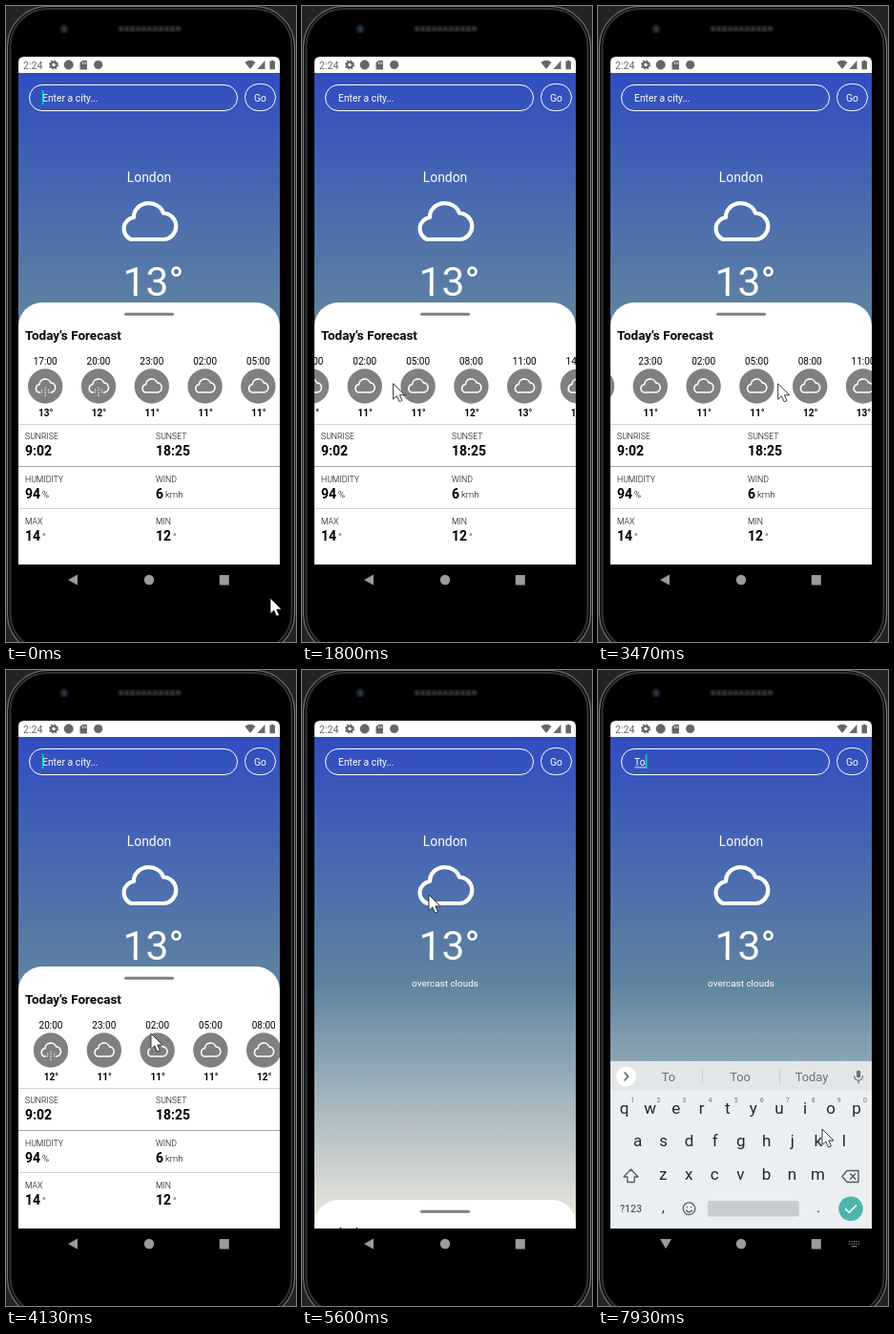
An HTML page for the animation above (8 s loop, 304 px wide and 665 px high).

```html
<!DOCTYPE html>
<html lang="en">
<head>
<meta charset="utf-8">
<title>Weather app</title>
<style>
  html, body { margin: 0; width: 100%; height: 100%; overflow: hidden; background: #000; }
  svg { display: block; width: 100%; height: 100%; font-family: Roboto, sans-serif; }
  .mid { text-anchor: middle; }
  .bold { font-weight: 700; }
  .light { font-weight: 300; }
  .line { fill: none; stroke-linecap: round; stroke-linejoin: round; }
</style>
</head>
<body>
<svg id="stage" viewBox="0 0 304 665"></svg>
<script>
const LOOP = 8000;
const stage = document.getElementById('stage');
const $ = id => document.getElementById(id);

const text = (x, y, size, str, cls = '', extra = '') =>
  `<text x="${x}" y="${y}" font-size="${size}" class="${cls}" ${extra}>${str}</text>`;
const rect = (x, y, w, h, fill, r = 0, extra = '') =>
  `<rect x="${x}" y="${y}" width="${w}" height="${h}" rx="${r}" fill="${fill}" ${extra}/>`;
const circle = (x, y, r, fill, extra = '') =>
  `<circle cx="${x}" cy="${y}" r="${r}" fill="${fill}" ${extra}/>`;
const line = (d, color, width = 1, extra = '') =>
  `<path class="line" d="${d}" stroke="${color}" stroke-width="${width}" ${extra}/>`;
const shape = (d, fill, extra = '') => `<path d="${d}" fill="${fill}" ${extra}/>`;

const cloud = (x, y, scale) => line(
  'M-19 19H16A13.8 13.8 0 0 0 15-8.5A15.8 14 0 0 0-16-4A12 12 0 0 0-19 19Z', '#fff', 4.2,
  `transform="translate(${x} ${y}) scale(${scale})"`);

function phone() {
  return rect(0, 0, 304, 665, '#232324') +
    rect(1.5, .5, 301, 677, '#08090a', 42, 'stroke="#6f7478" stroke-width="1.2"') +
    rect(4.5, 3, 295, 671, '#000', 39, 'stroke="#2e3235" stroke-width="2"') +
    circle(61, 24, 5, '#15191e') + circle(61, 24, 2.6, '#26384e') +
    rect(117, 20.5, 67, 6.5, '#171717', 3.2) +
    line('M120 24H182', '#2b2b2b', 4, 'stroke-dasharray="1 5"');
}

function statusBar() {
  const ink = '#666';
  return rect(13, 53, 274, 17, '#fff') + text(18, 65.8, 10.6, '2:24', '', `fill="${ink}"`) +
    circle(50, 61.5, 2.9, 'none', `stroke="${ink}" stroke-width="2.2"`) +
    circle(50, 61.5, 4.4, 'none', `stroke="${ink}" stroke-width="1.4" stroke-dasharray="1.8 1.65"`) +
    circle(65.7, 61.5, 5, ink) +
    shape('M80 57H85V66.5H77.5V59.5Z', ink) + line('M80.5 58.8V60.5M82.2 58.8V60.5M83.8 58.8V60.5', '#fff', .7) +
    circle(96.7, 61.5, 4.6, ink) +
    shape('M250.5 59Q256 54.5 261.5 59L256 66Z', ink) +
    shape('M263.5 66L271.5 57V66Z', ink) +
    shape('M276.5 57.8H278V56.8H280.5V57.8H282V66.3H276.5Z', ink);
}

function weather() {
  return rect(13, 70, 274, 514, 'url(#sky)') +
    rect(24.5, 82.5, 218, 27, 'none', 13.5, 'stroke="#fff"') +
    rect(250.5, 81.5, 32, 28, 'none', 14, 'stroke="#fff"') +
    `<g fill="#fff">` +
    text(266.5, 99.6, 10.4, 'Go', 'mid') +
    text(38, 99.6, 10.35, '', '', 'id="query"') +
    rect(38.5, 101.5, 12, .8, '#fff', 0, 'id="underline"') +
    text(150, 184, 13.9, 'London', 'mid') +
    text(122.6, 303, 42.6, '13°') +
    text(150, 331, 9.95, 'overcast clouds', 'mid') + '</g>' +
    rect(0, 88, 1.4, 15, '#00e0c6', 0, 'id="caret"') + cloud(150, 225, 1);
}

const forecast = [[17, 13], [20, 12], [23, 11], [2, 11], [5, 11], [8, 12], [11, 13], [14, 13]];

function forecastItem([hour, degrees], i) {
  const x = 41.2 + i * 55.8;
  const rain = i < 2
    ? rect(x - 5, 400.5, 10, 6, '#808080') +
      line(`M${x - 3.5} 401V405M${x} 399V409M${x + 3.5} 401V405`, '#fff', 1.2, 'stroke-dasharray=".3 2.4"')
    : '';
  return text(x, 375, 10, `${String(hour).padStart(2, 0)}:00`, 'mid') +
    circle(x, 397.5, 18.2, '#808080') + cloud(x, 397, .37) + rain +
    text(x + .5, 428.5, 10, degrees + '°', 'mid bold');
}

function detail(x, y, label, value, unit = '', unitX = 38) {
  return text(x, y, 8.7, label, 'light') + text(x, y + 17, 14, value, 'bold') +
    text(unitX, y + 16, 9.6, unit, 'light');
}

function sheet() {
  return `<g id="sheet" fill="#000">` +
    rect(13, 310, 274, 330, '#fff', 25) +
    rect(124, 320.8, 52, 3, '#808080', 1.5) +
    text(20, 349, 13.5, "Today's Forecast", 'bold') +
    `<g id="list">${forecast.map(forecastItem).join('')}</g>` +
    [437.5, 481.5, 525.5].map((y, i) => rect(13, y - .5, 274, 1, i === 1 ? '#a3aaa6' : '#d4d4d4')).join('') +
    detail(20, 453, 'SUNRISE', '9:02') + detail(157, 453, 'SUNSET', '18:25') +
    detail(20, 497.5, 'HUMIDITY', '94', '%') + detail(157, 497.5, 'WIND', '6', 'kmh', 167) +
    detail(20, 542, 'MAX', '14', '°') + detail(157, 542, 'MIN', '12', '°', 175) + '</g>';
}

const keyRows = [['qwertyuiop', 27.6, 465], ['asdfghjkl', 41.5, 499.5], ['zxcvbnm', 68.2, 534.5]];

const letters = upper => keyRows.map(([row, x0, y]) => [...row].map((key, i) =>
  text(x0 + i * 27.05, upper ? y : y - 1.5, 17, upper ? key.toUpperCase() : key, 'mid')).join('')).join('');

function keyboard() {
  const ink = '#4f5f66';
  const soft = '#65747b';
  const arrow = 'M34.5 522L42 530H38.2V535.5H30.8V530H27Z';
  const digits = [...'1234567890'].map((d, i) =>
    text(36.4 + i * 27.05, 452, 7, d, 'mid', `fill="${soft}"`)).join('');
  const tools = line('M31 421L27.5 425L31 429', ink, 1.5) +
    circle(64.5, 423.5, 3.8, 'none', `stroke="${soft}" stroke-width="1.6"`) + line('M67.5 426.5L71.5 430.5', soft, 1.8) +
    line('M100 419.5H110.5V426L106.5 430H100ZM106.5 430V426H110.5', soft, 1.4) +
    line('M103 424.5Q105 427 107.5 424.5M103 422H103.1M107.5 422H107.6', soft, 1.1) +
    text(145, 428.5, 9.8, 'GIF', 'mid', `fill="${ink}" font-weight="900"`) +
    rect(180, 419, 11.5, 11.5, soft, 1) + rect(209, 417, 1, 16, '#c8cdd0') +
    [230.3, 234.8, 239.3].map(x => circle(x, 425, 1.4, soft)).join('');
  const words = line('M28 421L31.5 425L28 429', ink, 1.5) +
    [['To', 74], ['Too', 149], ['Today', 224]].map(([w, x]) => text(x, 429.7, 12.8, w, 'mid', `fill="${soft}"`)).join('') +
    rect(109, 417, 1, 16, '#c8cdd0') + rect(190, 417, 1, 16, '#c8cdd0');
  return `<g id="keyboard" fill="#1d292e">` +
    rect(13, 409, 274, 175, '#eceff1') + rect(13, 409, 274, 31, '#e3e6e8') +
    circle(29.5, 425, 10.5, '#fff') +
    rect(271, 418.5, 4.2, 8, soft, 2.1) + line('M268.7 424.5Q269 429 273.1 429Q277.2 429 277.5 424.5M273.1 429V432', soft, 1.2) +
    digits +
    `<g id="upper">${tools}${letters(true)}${shape(arrow, ink)}</g>` +
    `<g id="lower">${words}${letters(false)}${line(arrow, ink, 1.3)}</g>` +
    line('M256 529.5L261 523.5H273V535.5H261ZM264.5 526.8L269.8 532.2M269.8 526.8L264.5 532.2', ink, 1.4) +
    text(34.5, 567, 10.5, '?123', 'mid', `fill="${ink}" font-weight="500"`) + text(68.5, 567, 14, ',', 'mid') +
    circle(95.5, 563.2, 6.3, 'none', `stroke="${ink}" stroke-width="1.3"`) +
    line('M92.5 565Q95.5 568.6 98.5 565M93.3 561.5H93.4M97.7 561.5H97.8', ink, 1.4) +
    rect(115, 555, 96, 16.5, '#c9cdcf', 2) + text(231, 567, 14, '.', 'mid') +
    circle(265, 563.3, 12.8, '#4db6ac') + line('M259.5 563.5L263.3 567.3L270.5 560', '#fff', 1.6) + '</g>';
}

function navigation() {
  const ink = '#9b9b9b';
  const keys = [597.7, 600.2].map(y => line(`M263.5 ${y}H274`, ink, 1.3, 'stroke-dasharray=".1 2.4"')).join('');
  return rect(13, 584, 274, 33, '#000') +
    shape('M65 600L75 594.5V605.5Z', ink, 'id="back"') +
    shape('M65 595H77L71 605Z', ink, 'id="hide"') +
    circle(150, 600, 5.2, ink) + rect(223.8, 595, 10, 10.5, ink, .5) +
    `<g id="switch">${keys}${line('M266 602.8H271', ink, 1.1)}</g>`;
}

stage.innerHTML = `<defs>
  <linearGradient id="sky" x1="0" y1="0" x2="0" y2="1">
    <stop offset="0" stop-color="#304dc1"/><stop offset=".5" stop-color="#5f84a0"/><stop offset="1" stop-color="#f0ebdf"/>
  </linearGradient>
  <clipPath id="screen"><path d="M13 584V59Q13 53 19 53H281Q287 53 287 59V584Z"/></clipPath></defs>` +
  phone() + `<g clip-path="url(#screen)">${weather()}${statusBar()}${sheet()}${keyboard()}</g>` + navigation() +
  shape('M0 0V16.5L3.8 13L6.5 19L9.4 17.7L6.8 12H12Z', '#fff', 'id="pointer" stroke="#222" stroke-width=".9"');

// Each key is [time, ...values]; values ease from one key to the next.
function track(keys, t) {
  const next = keys.findIndex(key => key[0] > t);
  if (next < 0) return keys[keys.length - 1].slice(1);
  if (next === 0) return keys[0].slice(1);
  const [a, b] = [keys[next - 1], keys[next]];
  const p = (t - a[0]) / (b[0] - a[0]);
  const eased = p * p * (3 - 2 * p);
  return a.slice(1).map((v, i) => v + (b[i + 1] - v) * eased);
}

const pointerKeys = [
  [0, 277, 619], [850, 190, 396], [1130, 183, 391], [1600, 75, 394], [2100, 133, 396],
  [2730, 183, 396], [3000, 200, 396], [3400, 200, 396], [3700, 120, 388], [4000, 168, 382],
  [4130, 152, 380], [4450, 150, 320], [5200, 150, 564], [5300, 148, 540], [5600, 133, 235],
  [5950, 70, 96], [6250, 70, 96], [6800, 136, 446], [7150, 138, 456], [7600, 245, 460],
  [7930, 235, 480], [8000, 232, 485]
];
const scrollKeys = [
  [1130, 0], [1600, 108], [1950, 165], [2100, 165], [2730, 115], [3000, 98], [3700, 98], [4000, 50]
];
const sheetKeys = [[4450, 0], [5200, 244]];
const keyboardKeys = [[6300, 175], [6560, 0]];
const FOCUS = 6250, FIRST_KEY = 7200, SECOND_KEY = 7650;

const move = (id, x, y) => $(id).setAttribute('transform', `translate(${x} ${y})`);
const show = (id, on) => $(id).setAttribute('visibility', on ? 'visible' : 'hidden');

function draw(t) {
  move('pointer', ...track(pointerKeys, t));
  move('list', -track(scrollKeys, t)[0], 0);
  move('sheet', 0, track(sheetKeys, t)[0]);
  move('keyboard', 0, track(keyboardKeys, t)[0]);

  const typed = t >= SECOND_KEY ? 'To' : t >= FIRST_KEY ? 'T' : '';
  const typedWidth = [0, 6.2, 11.8][typed.length];
  $('query').textContent = typed || 'Enter a city...';
  $('underline').setAttribute('width', typedWidth);
  $('caret').setAttribute('x', 38 + typedWidth);

  // The blink restarts on focus and on every key press.
  const blinkStart = [SECOND_KEY, FIRST_KEY, FOCUS].find(start => t >= start) ?? -120;
  show('caret', (t - blinkStart) % 1000 < 500);

  const open = t >= 6300;
  show('keyboard', open);
  show('upper', open && !typed);
  show('lower', open && typed);
  show('back', !open);
  show('hide', open);
  show('switch', open);
}

function frame() {
  draw(performance.now() % LOOP);
  requestAnimationFrame(frame);
}
frame();
</script>
</body>
</html>
```
